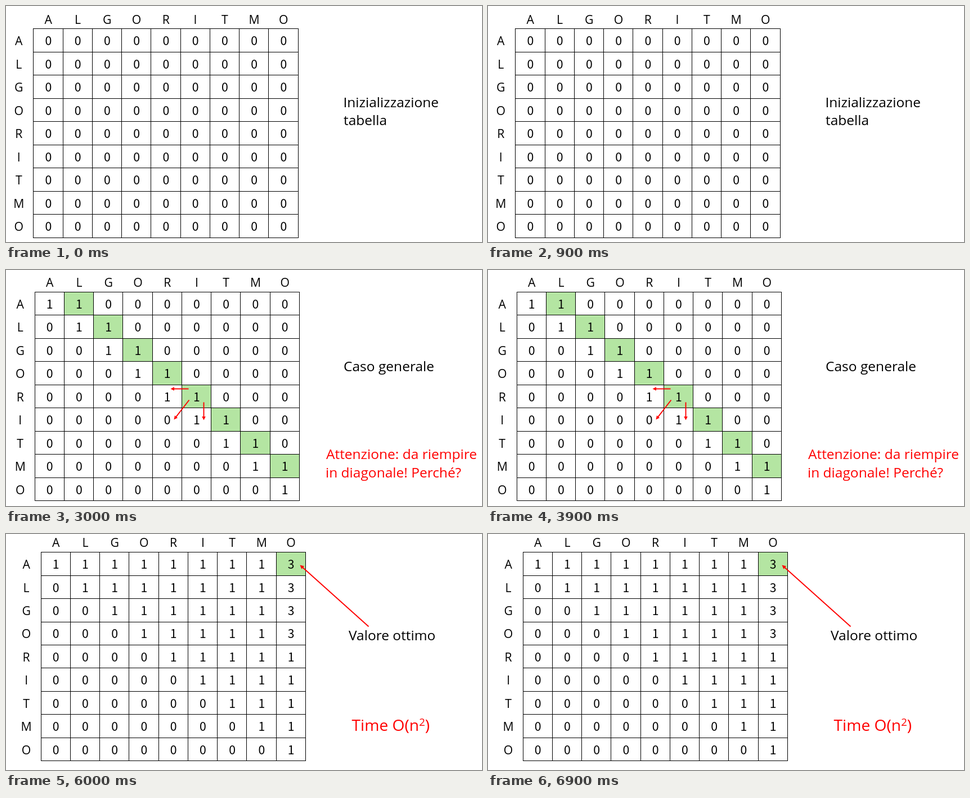
Recreate the animation shown at these times as an HTML page with a canvas. Size 846 by 422 pixels, loop 7500 ms.

```html
<!DOCTYPE html>
<html lang="it">
<head>
<meta charset="utf-8">
<title>Tabella di programmazione dinamica</title>
<style>
  html, body { margin: 0; width: 100%; height: 100%; overflow: hidden; background: #fff; }
  canvas { display: block; }
</style>
</head>
<body>
<canvas width="846" height="422"></canvas>
<script>
const ctx = document.querySelector('canvas').getContext('2d');
const LETTERS = '"Open Sans", "Noto Sans", sans-serif';
const DIGITS = '"Noto Sans CJK SC", "Noto Sans CJK JP", "Noto Sans CJK", sans-serif';
const WORD = 'ALGORITMO', N = WORD.length;
const CELL_W = 52.25, CELL_H = 41.48, STEP_MS = 1500;
const RED = '#f00', GREEN = '#b4e5a2';

function text(str, x, y, color = '#000', size = 24.5, family = LETTERS, align = 'left') {
  ctx.font = `${size}px ${family}`;
  ctx.fillStyle = color;
  ctx.textAlign = align;
  ctx.fillText(str, x, y);
  return x + ctx.measureText(str).width;
}

function arrow(x1, y1, x2, y2, head = 6.5) {
  ctx.save();
  ctx.translate(x2 + .5, y2 + .5);
  ctx.rotate(Math.atan2(y2 - y1, x2 - x1));
  ctx.strokeStyle = ctx.fillStyle = RED;
  ctx.lineWidth = 1.9;
  ctx.beginPath();
  ctx.moveTo(-Math.hypot(x2 - x1, y2 - y1), 0);
  ctx.lineTo(-head + 1, 0);
  ctx.stroke();
  ctx.beginPath();
  ctx.moveTo(0, 0);
  ctx.lineTo(-head, -head / 2);
  ctx.lineTo(-head, head / 2);
  ctx.fill();
  ctx.restore();
}

function table(x0, y0, value, marked) {
  const left = k => Math.floor(x0 + k * CELL_W);
  const top = k => Math.floor(y0 + k * CELL_H);
  const midX = k => x0 + (k + .5) * CELL_W + .4;
  const baseY = k => y0 + (k + .5) * CELL_H + 8.7;
  const label = (str, x, y, family) => text(str, x, y, '#000', 21.2, family, 'center');

  for (let i = 0; i < N; i++)
    for (let j = 0; j < N; j++) {
      if (marked(i, j)) {
        ctx.fillStyle = GREEN;
        ctx.fillRect(left(j), top(i), left(j + 1) - left(j), top(i + 1) - top(i));
      }
      label(value(i, j), midX(j), baseY(i), DIGITS);
    }

  ctx.fillStyle = '#000';
  for (let k = 0; k <= N; k++) {
    ctx.fillRect(left(k), top(0), 1, top(N) - top(0) + 1);
    ctx.fillRect(left(0), top(k), left(N) - left(0) + 1, 1);
  }
  [...WORD].forEach((c, k) => {
    label(c, midX(k), y0 - 9.4, LETTERS);
    label(c, x0 - 26, baseY(k), LETTERS);
  });
}

function setup() {
  table(48.8, 40.9, () => 0, () => false);
  text('Inizializzazione', 599.5, 181.3);
  text('tabella', 600, 213.3);
}

function baseCases() {
  table(50.2, 38.3, (i, j) => +(i === j), (i, j) => j <= i);
  text('Casi base', 600, 181.3);
}

function generalCase() {
  table(51.2, 39.3, (i, j) => +(j === i || j === i + 1), (i, j) => j === i + 1);
  arrow(324, 212, 292, 212);
  arrow(325, 232, 298, 267);
  arrow(351, 236, 351, 268);
  text('Caso generale', 600, 181.3);
  text('Attenzione: da riempire', 569, 337.8, RED);
  text('in diagonale! Perché?', 568, 370.6, RED);
}

function optimum() {
  table(62.1, 32.6, (i, j) => j < i ? 0 : j === N - 1 && i < 4 ? 3 : 1,
    (i, j) => i === 0 && j === N - 1);
  arrow(644, 165, 522, 55, 7);
  text('Valore ottimo', 609, 190.4);
}

function complexity() {
  optimum();
  let x = text('Time O(n', 614.5, 352.4, RED, 28.2);
  x = text('2', x, 343, RED, 18.5);
  text(')', x, 352.4, RED, 28.2);
}

const scenes = [setup, baseCases, generalCase, optimum, complexity];

function draw() {
  ctx.fillStyle = '#fff';
  ctx.fillRect(0, 0, 846, 422);
  scenes[Math.floor((performance.now() - start) / STEP_MS) % scenes.length]();
  requestAnimationFrame(draw);
}

const start = performance.now();
draw();
</script>
</body>
</html>
```
